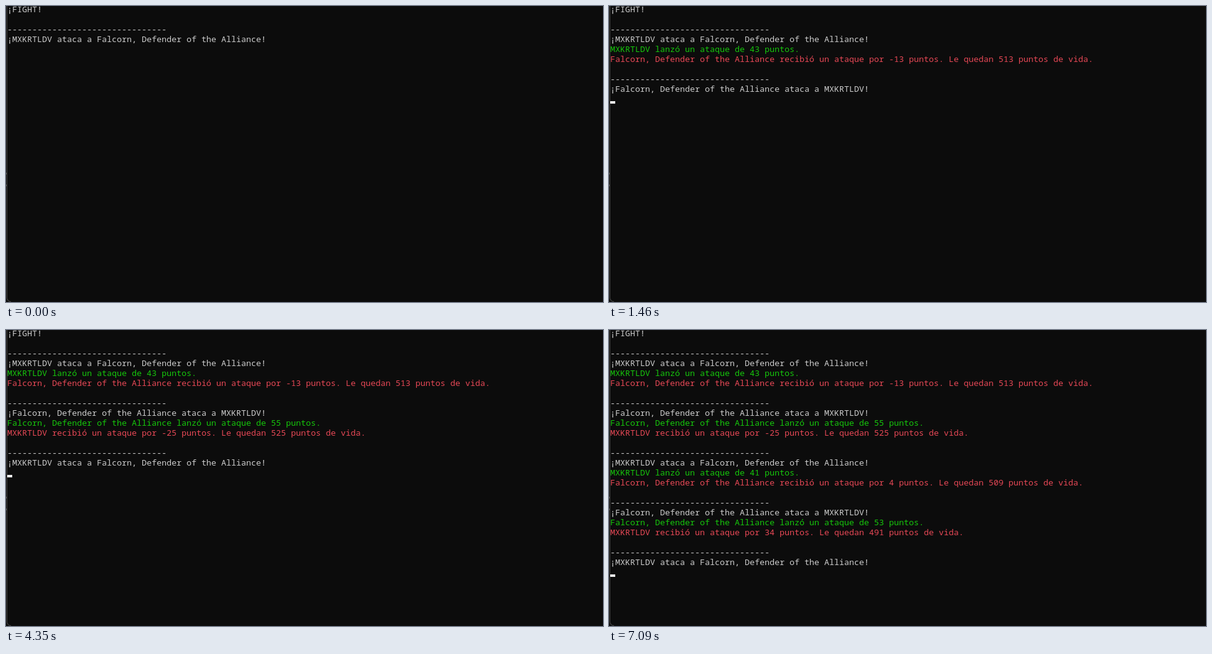
Recreate the animation shown at these times as an HTML page. Size 959 by 476 pixels, loop 8 s.

```html
<!DOCTYPE html>
<html lang="es">
<head>
<meta charset="utf-8">
<title>Combate</title>
<style>
  html, body {
    margin: 0;
    width: 100%;
    height: 100%;
    overflow: hidden;
    background: #0c0c0c;
  }
  .edge {
    position: absolute;
    top: 0;
    bottom: 0;
    left: 1px;
    width: 6px;
    border: solid #484848;
    border-width: 0 0 1px 1px;
    border-bottom-left-radius: 7px;
  }
  .notch {
    position: absolute;
    left: 0;
    width: 1px;
    height: 3px;
    background: #484848;
  }
  /* The console grows by whole rows of 16px; the cursor sits on the row below. */
  .console {
    position: absolute;
    left: 2px;
    right: 0;
    top: -3px;
    animation: rows 8s step-end infinite;
  }
  .log {
    height: 100%;
    margin: 0;
    overflow: hidden;
    font: 13.3333px/16px "Noto Sans Mono", monospace;
    font-variant-ligatures: none;
    color: #ccc;
  }
  .hit { color: #16c60c; }
  .hurt { color: #e74856; }
  .cursor {
    position: absolute;
    left: 0;
    top: calc(100% + 12px);
    width: 8px;
    height: 4px;
    background: #f2f2f2;
    animation: cursor 8s step-end infinite;
  }
  @keyframes rows {
    0% { height: 64px; }
    8.25% { height: 80px; }
    9.125% { height: 144px; }
    24.25% { height: 224px; }
    74.375% { height: 304px; }
    88.625%, 100% { height: 384px; }
  }
  @keyframes cursor {
    0% { visibility: hidden; }
    8.25%, 100% { visibility: visible; }
  }
</style>
</head>
<body>
<div class="edge"></div>
<div class="notch" style="top: 268px"></div>
<div class="notch" style="top: 287px"></div>
<div class="console">
<pre class="log">¡FIGHT!

--------------------------------
¡MXKRTLDV ataca a Falcorn, Defender of the Alliance!
<span class="hit">MXKRTLDV lanzó un ataque de 43 puntos.</span>
<span class="hurt">Falcorn, Defender of the Alliance recibió un ataque por -13 puntos. Le quedan 513 puntos de vida.</span>

--------------------------------
¡Falcorn, Defender of the Alliance ataca a MXKRTLDV!
<span class="hit">Falcorn, Defender of the Alliance lanzó un ataque de 55 puntos.</span>
<span class="hurt">MXKRTLDV recibió un ataque por -25 puntos. Le quedan 525 puntos de vida.</span>

--------------------------------
¡MXKRTLDV ataca a Falcorn, Defender of the Alliance!
<span class="hit">MXKRTLDV lanzó un ataque de 41 puntos.</span>
<span class="hurt">Falcorn, Defender of the Alliance recibió un ataque por 4 puntos. Le quedan 509 puntos de vida.</span>

--------------------------------
¡Falcorn, Defender of the Alliance ataca a MXKRTLDV!
<span class="hit">Falcorn, Defender of the Alliance lanzó un ataque de 53 puntos.</span>
<span class="hurt">MXKRTLDV recibió un ataque por 34 puntos. Le quedan 491 puntos de vida.</span>

--------------------------------
¡MXKRTLDV ataca a Falcorn, Defender of the Alliance!
</pre>
<div class="cursor"></div>
</div>
</body>
</html>
```
